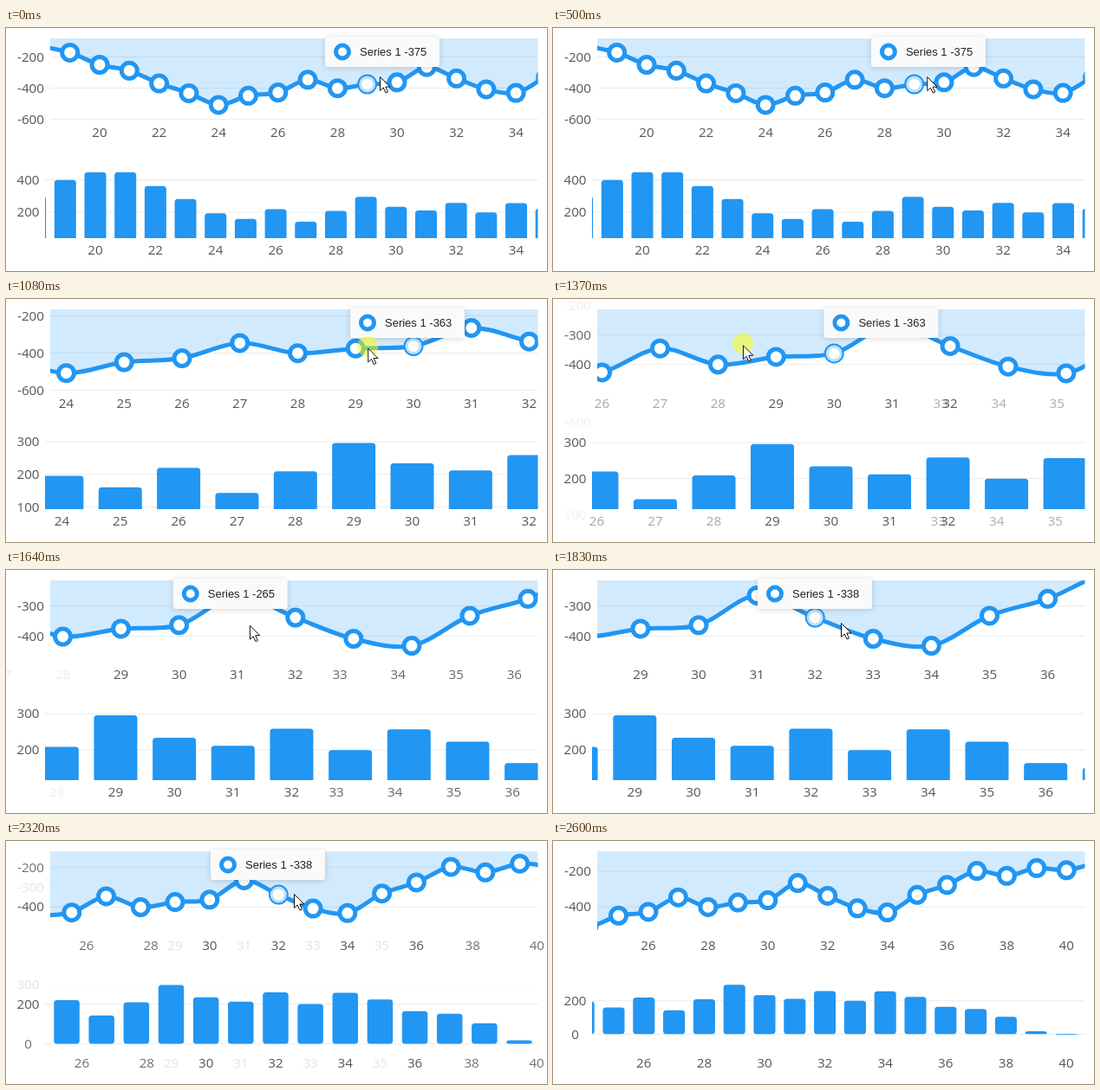
Animation of 624x281 px, one loop 3100 ms. Source, as an HTML page:

```html
<!DOCTYPE html>
<html lang="en">
<head>
<meta charset="utf-8">
<title>Zooming charts</title>
<style>
html, body { margin: 0; width: 100%; height: 100%; overflow: hidden; background: #fff; }
svg { display: block; width: 624px; height: 281px; }
.axis { font: 15.2px "Open Sans", "Noto Sans", sans-serif; fill: #555; text-anchor: middle; }
.grid { stroke: #ebebeb; }
.dot { fill: #fff; stroke: #2196f3; stroke-width: 5; }
#tip rect { fill: #fafafa; filter: drop-shadow(0 1px 3px rgba(0, 0, 0, .16)); }
#tip text { font: 13px "Liberation Sans", Arial, sans-serif; fill: #232323; }
</style>
</head>
<body>
<svg viewBox="0 0 624 281">
  <defs>
    <clipPath id="top"><rect x="51" y="12" width="562.5" height="94.5"/></clipPath>
    <clipPath id="bottom"><rect x="45" y="154" width="568.5" height="89"/></clipPath>
  </defs>
  <g id="linePlot" clip-path="url(#top)"></g>
  <g id="barPlot" clip-path="url(#bottom)"></g>
  <g id="labels" class="axis"></g>
  <g id="tip">
    <rect y="10" width="132" height="35" rx="3"/>
    <circle class="dot" cx="20" cy="27.5" r="7.5"/>
    <text x="40" y="32"></text>
  </g>
  <g id="cursor">
    <circle id="press" cx="-.5" cy="-2" r="12" fill="#ff0" fill-opacity=".5"/>
    <path d="M0 0V16L3.7 12.5l2.8 6 2.5-1.1L6.3 11.5H11.3Z" fill="#fff" stroke="#111"/>
  </g>
</svg>
<script>
const LOOP = 3100, FIRST = 18, REFRESH = 2100 / 31;

// Each view: [category width, x of category 30, y of ref, px per unit]:
// overview, zoomed in, panned, zoomed out.
const line = {
  data: [-130, -172, -250, -288, -370, -433, -508, -449, -428, -346, -401, -375,
    -363, -265, -338, -408, -431, -332, -276, -197, -225, -181, -193, -150],
  views: [[34.3, 451, 69.5, .18], [66.75, 470, 62.5, .215], [67.1, 168, 76.7, .35], [34.45, 247.8, 76.2, .205]],
  ref: -400, left: 51, y0: 12, y1: 106.5, labelX: 28.5, labelY: 125.5
};
const bars = {
  data: [299, 400, 448, 448, 363, 283, 195, 160, 220, 143, 209, 296,
    234, 212, 259, 200, 257, 223, 164, 151, 104, 17, -4, -10],
  views: [[34.68, 449.8, 213.2, .1875], [67.35, 468.5, 202.7, .377], [67.7, 162, 208.2, .42], [34.8, 244, 184.8, .1925]],
  ref: 200, left: 45, y0: 154, y1: 243, labelX: 25.5, labelY: 261.5
};

// Moves between the views; the value axis settles with its own power.
const moves = [
  { start: 470, length: 525, power: 2, powerY: 3 },
  { start: 1080, length: 638, power: 1.2, powerY: 4.4 },
  { start: 1900, length: 667, power: 2, powerY: 2 }
];
// [time, x, y]
const cursorPath = [[440, 431.5, 56.5], [980, 436.5, 58.5], [1080, 417.5, 57], [1370, 204.5, 53.5],
  [1460, 140, 53.5], [1640, 298.5, 65.5], [1800, 332.5, 61.5]];
// [time, x]
const tipPath = [[440, 368], [680, 359], [900, 397], [1080, 397], [1370, 306], [1640, 184], [1820, 236]];

const $ = id => document.getElementById(id);
const n = v => +v.toFixed(2);
const clamp = (v, lo, hi) => Math.max(lo, Math.min(hi, v));
const mix = (a, b, u) => a + (b - a) * u;
const mixAll = (a, b, u) => a.map((v, i) => mix(v, b[i], u));
const easeOut = (u, power) => 1 - (1 - u) ** power;

function along(keys, t) {
  const i = clamp(keys.findLastIndex(k => k[0] <= t), 0, keys.length - 2);
  const [a, b] = [keys[i], keys[i + 1]];
  return mixAll(a, b, clamp((t - a[0]) / (b[0] - a[0]), 0, 1)).slice(1);
}

const xOf = (view, cat) => view[0] * (cat - 30) + view[1];
const yOf = (chart, view, v) => view[2] - (v - chart.ref) * view[3];

// Which ticks a settled view shows.
function showsCategory(view, cat) {
  const x = xOf(view, cat);
  return +(x > 55 && x < 611 && (view[0] > 50 || cat % 2 === 0));
}
function showsLevel(chart, view, v) {
  const y = yOf(chart, view, v), gap = view[3] > .34 ? 100 : 200;
  return +(y > chart.y0 && y < chart.y1 && v % gap === 0);
}

function text(x, y, s, alpha) {
  return alpha < .02 ? '' : `<text x="${n(x)}" y="${n(y)}" opacity="${n(alpha)}">${s}</text>`;
}

function layout(chart, i, u, uY) {
  const from = chart.views[i], to = chart.views[i + 1];
  const view = [...mixAll(from, to, u).slice(0, 2), ...mixAll(from, to, uY).slice(2)];
  const y = v => yOf(chart, view, v);
  let grid = '', labels = '';

  for (let v = -600; v <= 400; v += 100) {
    const alpha = mix(showsLevel(chart, from, v), showsLevel(chart, to, v), uY);
    labels += text(chart.labelX, y(v) + 5.2, v, alpha);
    if (alpha > .02) grid += `<path class="grid" opacity="${n(alpha)}" d="M${chart.left} ${n(y(v))}H614"/>`;
  }
  const points = chart.data.map((v, k) => {
    const cat = FIRST + k, x = xOf(view, cat);
    const before = showsCategory(from, cat), after = showsCategory(to, cat);
    // Entering labels run ahead, halfway to their place.
    const labelX = after > before ? mix(x, xOf(to, cat), .5) : x;
    labels += text(labelX, chart.labelY, cat, mix(before, after, u));
    return [x, y(v)];
  });
  return { width: view[0], points, grid, labels, zero: y(0) };
}

// Cubic spline with control points weighted by neighbour distance.
function spline(pts) {
  const at = i => pts[clamp(i, 0, pts.length - 1)];
  const mid = (p, q) => mixAll(p, q, .5);
  const dist = (p, q) => Math.hypot(p[0] - q[0], p[1] - q[1]);
  const smooth = .65;
  let d = 'M' + pts[0].map(n);
  for (let i = 0; i < pts.length - 1; i++) {
    const [p0, p1, p2, p3] = [at(i - 1), at(i), at(i + 1), at(i + 2)];
    const [c1, c2, c3] = [mid(p0, p1), mid(p1, p2), mid(p2, p3)];
    const [l1, l2, l3] = [dist(p0, p1), dist(p1, p2), dist(p2, p3)];
    const m1 = mixAll(c1, c2, l1 / (l1 + l2)), m2 = mixAll(c2, c3, l2 / (l2 + l3));
    const handle = (m, p) => m.map((v, k) => n((c2[k] - v) * smooth + p[k]));
    d += `C${handle(m1, p1)} ${handle(m2, p2)} ${p2.map(n)}`;
  }
  return d;
}

function drawLine({ points, grid }, hover) {
  const d = spline(points);
  const circle = ([x, y], rest) => `<circle cx="${n(x)}" cy="${n(y)}" ${rest}/>`;
  $('linePlot').innerHTML = grid
    + `<path d="${d}V-90H${n(points[0][0])}Z" fill="#2196f3" fill-opacity=".2"/>`
    + `<path d="${d}" fill="none" stroke="#2196f3" stroke-width="5"/>`
    + points.map(p => circle(p, 'class="dot" r="9"')).join('')
    + (hover ? circle(points[hover - FIRST], 'r="9.5" fill="#fff" fill-opacity=".7"') : '');
}

function drawBars({ points, grid, width, zero }) {
  const w = Math.min(50, .83 * width - 3.8);
  $('barPlot').innerHTML = grid + points.map(([x, y]) =>
    `<rect x="${n(x - w / 2)}" y="${n(Math.min(y, zero))}" width="${n(w)}" height="${n(Math.max(1, Math.abs(zero - y)))}" rx="3.5" fill="#2196f3"/>`
  ).join('');
}

function draw(t) {
  const i = Math.max(0, moves.findLastIndex(m => m.start <= t));
  const { start, length, power, powerY } = moves[i];
  const u = clamp((t - start) / length, 0, 1);
  const [top, low] = [line, bars].map(c => layout(c, i, easeOut(u, power), easeOut(u, powerY)));
  const pointer = t < 2460;
  const hover = t < 600 ? 29 : t < 1500 ? 30 : t < 1750 ? 31 : 32;

  drawLine(top, pointer && hover);
  drawBars(low);
  $('labels').innerHTML = top.labels + low.labels;

  $('tip').style.display = $('cursor').style.display = pointer ? '' : 'none';
  $('tip').setAttribute('transform', `translate(${along(tipPath, t).map(n)} 0)`);
  $('tip').querySelector('text').textContent = `Series 1 ${line.data[hover - FIRST]}`;
  $('cursor').setAttribute('transform', `translate(${along(cursorPath, t).map(n)})`);
  $('press').style.display = t > 1060 && t < 1480 ? '' : 'none';
}

// The picture rests for 500 ms, then refreshes at a fixed rate.
const held = t => t < 500 ? 0 : 469 + Math.floor((t - 469) / REFRESH) * REFRESH;

let begin, shown;
function frame(now) {
  begin ??= now;
  const t = held((now - begin) % LOOP);
  if (t !== shown) draw(shown = t);
  requestAnimationFrame(frame);
}
draw(0);
requestAnimationFrame(frame);
</script>
</body>
</html>
```
